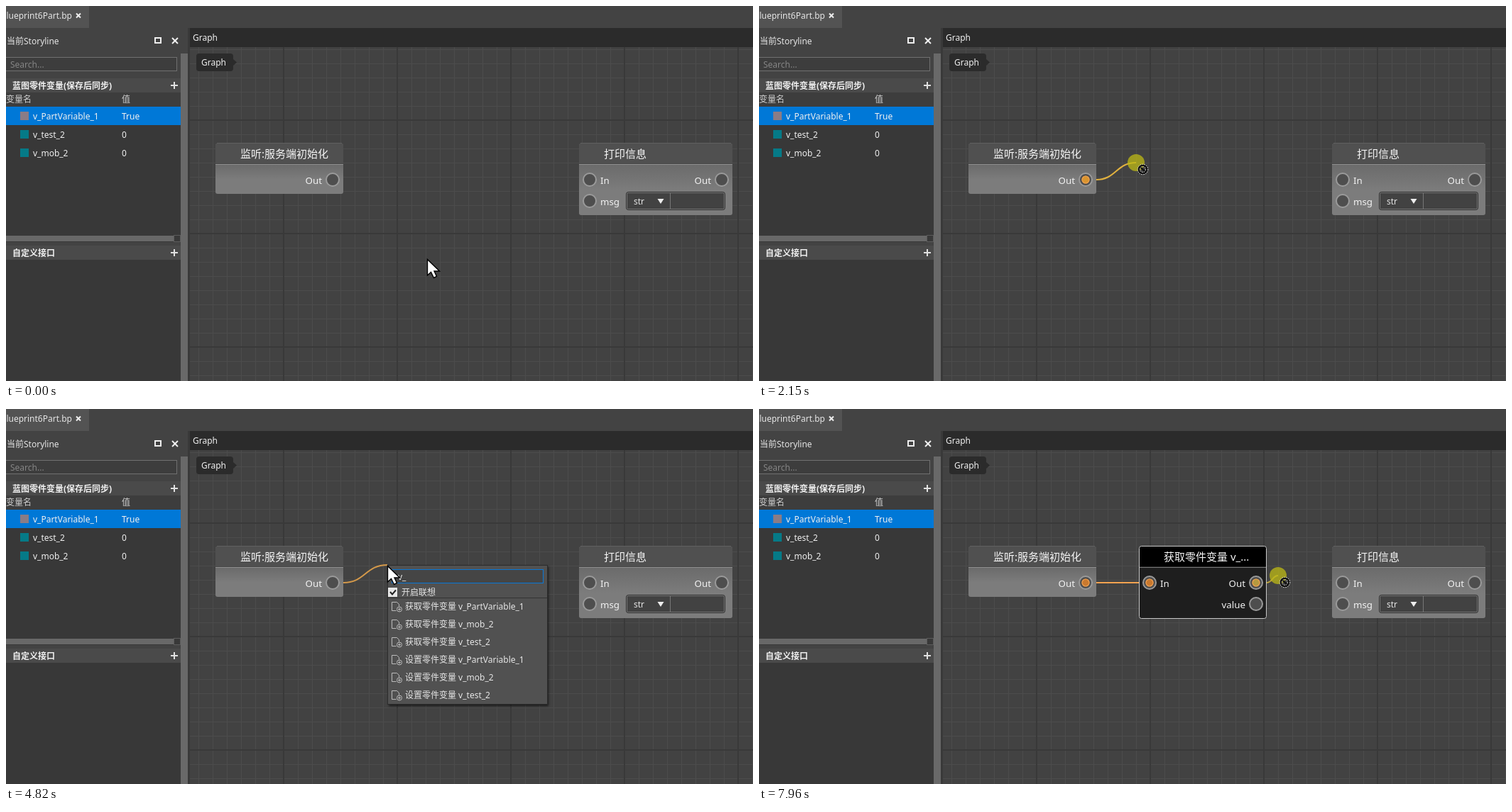
An HTML page with a canvas that plays this animation: 1052x529 px, repeating every 8000 ms.

```html
<!DOCTYPE html>
<html lang="zh">
<head>
<meta charset="utf-8">
<title>Node graph</title>
<style>
html, body { margin: 0; width: 100%; height: 100%; overflow: hidden; background: #424242; }
canvas { display: block; }
</style>
</head>
<body>
<canvas id="stage" width="1052" height="529"></canvas>
<script>
const ctx = document.getElementById('stage').getContext('2d');
const LOOP = 8000;
const FAMILY = '"Noto Sans", "Noto Sans CJK SC", "Noto Sans CJK", sans-serif';

// Pointer moves: first and last change, step count, start, control and end point.
const MOVES = [
  [70, 830, 11, [593, 357], [525, 300], [467, 248]],
  [900, 1660, 11, [467, 248], [482, 223], [516, 221]],
  [1730, 2360, 10, [516, 221], [528, 220], [537, 221]],
  [5610, 5880, 4, [537, 221], [552, 250], [575, 270]],
  [7020, 7160, 3, [575, 270], [664, 244], [688, 239]],
  [7420, 7490, 2, [688, 239], [691, 240], [693, 241]],
  [7820, 7960, 3, [693, 241], [712, 237], [731, 235]]
];
const CARETS = [[2430, 2900, 552], [3300, 3960, 558], [4160, 4820, 563], [5350, 5880, 563]];

const ALL_GROUPS = ['基础节点', '旧版节点', '零件节点', '零件界面节点', 'SdkNode', '拷贝模板',
  '零件变量', '创建分组', '内置游戏接口', '内置Python接口'];
const V_GROUPS = ['旧版节点', '零件节点', '零件界面节点', '零件变量', '内置游戏接口', '内置Python接口'];
const VARIABLES = ['v_PartVariable_1', 'v_mob_2', 'v_test_2'];
const MATCHES = ['获取', '设置'].flatMap(verb => VARIABLES.map(name => verb + '零件变量 ' + name));

function rect(x, y, w, h, color) {
  ctx.fillStyle = color;
  ctx.fillRect(x, y, w, h);
}

function frame(x, y, w, h, color) {
  ctx.strokeStyle = color;
  ctx.lineWidth = 1;
  ctx.strokeRect(x + .5, y + .5, w - 1, h - 1);
}

function roundBox(x, y, w, h, radius, fill, stroke) {
  ctx.beginPath();
  ctx.roundRect(x, y, w, h, radius);
  if (fill) { ctx.fillStyle = fill; ctx.fill(); }
  if (stroke) { ctx.strokeStyle = stroke; ctx.lineWidth = 1; ctx.stroke(); }
}

function text(str, x, y, color = '#e6e6e6', size = 12, weight = 400, align = 'left') {
  ctx.font = `${weight} ${size}px ${FAMILY}`;
  ctx.textAlign = align;
  ctx.fillStyle = color;
  ctx.fillText(str, x, y);
}

function line(points, color, width = 1) {
  ctx.beginPath();
  points.forEach(([x, y], i) => i ? ctx.lineTo(x, y) : ctx.moveTo(x, y));
  ctx.strokeStyle = color;
  ctx.lineWidth = width;
  ctx.stroke();
}

function polygon(points, fill) {
  ctx.beginPath();
  points.forEach(([x, y]) => ctx.lineTo(x, y));
  ctx.closePath();
  ctx.fillStyle = fill;
  ctx.fill();
}

function disc(x, y, r, fill) {
  ctx.beginPath();
  ctx.arc(x, y, r, 0, Math.PI * 2);
  ctx.fillStyle = fill;
  ctx.fill();
}

function ring(x, y, r, stroke, width) {
  ctx.beginPath();
  ctx.arc(x, y, r, 0, Math.PI * 2);
  ctx.strokeStyle = stroke;
  ctx.lineWidth = width;
  ctx.stroke();
}

function cross(x, y, r) {
  line([[x - r, y - r], [x + r, y + r]], '#f0f0f0', 2);
  line([[x - r, y + r], [x + r, y - r]], '#f0f0f0', 2);
}

function plus(x, y) {
  rect(x - 5, y - 1, 10, 2, '#e0e0e0');
  rect(x - 1, y - 5, 2, 10, '#e0e0e0');
}

function drawPanel() {
  rect(0, 0, 1052, 31, '#434343');
  rect(0, 0, 117, 31, '#535353');
  text('blueprint6Part.bp', -7, 18);
  cross(102, 13.5, 3);

  rect(0, 31, 259, 498, '#434343');
  text('当前Storyline', 1, 54);
  ctx.strokeStyle = '#f0f0f0';
  ctx.lineWidth = 2;
  ctx.strokeRect(210, 45, 8, 7);
  cross(238, 49, 4);
  rect(0, 72, 241, 20, '#3d3d3d');
  frame(-1, 72, 242, 20, '#707070');
  text('Search...', 6, 87, '#858585');

  rect(0, 102, 246, 20, '#4a4a4a');
  text('蓝图零件变量(保存后同步)', 9, 117, '#f0f0f0', 12, 700);
  plus(237, 112);
  rect(0, 122, 246, 20, '#3d3d3d');
  text('变量名', 0, 136, '#d0d0d0');
  text('值', 163, 136, '#d0d0d0');
  rect(0, 142, 246, 181, '#383838');
  rect(0, 142, 246, 26, '#0078d7');
  [['v_PartVariable_1', 'True', '#8a7c86'], ['v_test_2', '0', '#057a87'], ['v_mob_2', '0', '#057a87']]
    .forEach(([name, value, color], i) => {
      const y = 149 + i * 26;
      rect(20, y, 12, 12, color);
      text(name, 38, y + 11, '#f0f0f0');
      text(value, 163, y + 11, '#f0f0f0');
    });
  rect(0, 323, 246, 10, '#383838');
  rect(0, 324, 236, 8, '#686868');
  frame(236, 323, 10, 10, '#5c5c5c');
  rect(0, 338, 246, 20, '#4a4a4a');
  text('自定义接口', 9, 353, '#f0f0f0', 12, 700);
  plus(237, 348);
  rect(0, 358, 246, 171, '#383838');
  rect(246, 67, 10, 462, '#696969');
  rect(256, 31, 3, 498, '#393939');
}

function drawGrid() {
  rect(259, 58, 793, 471, '#424242');
  for (let x = 271; x < 1052; x += 20) rect(x, 58, 1, 471, '#4c4c4c');
  for (let y = 61; y < 529; y += 20) rect(259, y, 793, 1, '#4c4c4c');
  for (let x = 391; x < 1052; x += 160) rect(x - 1, 58, 2, 471, '#393939');
  for (let y = 161; y < 529; y += 160) rect(259, y - 1, 793, 2, '#393939');
  rect(259, 31, 793, 27, '#2b2b2b');
  text('Graph', 263, 49, '#f0f0f0');
  roundBox(268, 67, 52, 25, 4, '#2b2b2b');
  polygon([[320, 75], [325, 79.5], [320, 84]], '#2b2b2b');
  text('Graph', 275, 84, '#f0f0f0');
}

function port(x, y, core) {
  disc(x, y, 9, '#4e4e4e');
  ring(x, y, 9, '#9a9a9a', 2);
  if (!core) return;
  disc(x, y, 5.5, core);
  ring(x, y, 5, '#f0a050', 1.2);
}

function label(str, x, y, align) {
  text(str, x, y, '#f2f2f2', 13.33, 400, align);
}

function node(x, w, h, title, selected) {
  const body = ctx.createLinearGradient(0, 224, 0, 194 + h);
  body.addColorStop(0, '#6b6b6b');
  body.addColorStop(.5, '#7c7c7c');
  body.addColorStop(1, '#7c7c7c');
  roundBox(x, 194, w, h, 3, selected ? '#1e1e1e' : body);
  roundBox(x, 194, w, 29, [3, 3, 0, 0], selected ? '#000' : '#505050');
  rect(x, 222, w, 1, selected ? '#1e1e1e' : '#484848');
  rect(x, 223, w, 1, selected ? '#777' : '#909090');
  if (selected) roundBox(x + .5, 193.5, w - 1, h + 1, 3, null, '#c8c8c8');
  else rect(x + 2, 193, w - 4, 1, '#606060');
  text(title, x + 35, 214, '#f5f5f5', 15);
}

function drawNodes(linked, firstCore, secondCore) {
  node(295, 180, 71, '监听:服务端初始化');
  label('Out', 445, 251, 'right');
  port(460, 245, firstCore);

  node(807, 216, 101, '打印信息');
  port(822, 245);
  port(822, 275);
  port(1008, 245);
  label('In', 837, 251);
  label('msg', 837, 281);
  label('Out', 993, 251, 'right');
  roundBox(873.5, 262.5, 139, 25, 3, '#424242', '#2f2f2f');
  roundBox(874.5, 263.5, 137, 23, 2, null, '#777');
  rect(935, 264, 1, 22, '#777');
  text('str', 884, 280);
  polygon([[917.5, 272], [926.5, 272], [922, 279]], '#eee');

  if (!linked) return;
  line([[475, 245], [535, 245]], '#f7a350', 2);
  node(535, 180, 101, '获取零件变量 v_...', true);
  port(550, 245, '#c9792f');
  port(700, 245, secondCore);
  port(700, 275);
  label('In', 565, 251);
  label('Out', 685, 251, 'right');
  label('value', 685, 281, 'right');
}

function wire(x, [endX, endY], color) {
  const mid = (x + endX) / 2;
  ctx.beginPath();
  ctx.moveTo(x, 245);
  ctx.bezierCurveTo(mid, 245, mid, endY, endX, endY);
  ctx.strokeStyle = color;
  ctx.lineWidth = 2;
  ctx.stroke();
}

function docIcon(x, y) {
  line([[x + 6, y + 6], [x, y + 6], [x, y - 6], [x + 7, y - 6], [x + 10, y - 3], [x + 10, y]], '#bcbcbc');
  ring(x + 10.5, y + 4, 3.5, '#bcbcbc', 1);
  line([[x + 8.5, y + 4], [x + 12.5, y + 4]], '#bcbcbc');
  line([[x + 10.5, y + 2], [x + 10.5, y + 6]], '#bcbcbc');
}

function drawMenu(t, tip) {
  const wide = t >= 4230;
  const items = wide ? MATCHES : t >= 3370 ? V_GROUPS : ALL_GROUPS;
  const w = wide ? 225 : 126;
  const h = wide ? 197 : items === V_GROUPS ? 214 : 330;
  const query = t < 3300 ? '' : t < 4160 ? 'v' : 'v_';

  ctx.save();
  ctx.shadowColor = 'rgba(0,0,0,.6)';
  ctx.shadowBlur = 3;
  ctx.shadowOffsetX = ctx.shadowOffsetY = 2;
  rect(537, 220, w, h, '#515151');
  ctx.restore();
  frame(537, 220, w + 1, h, '#2c2c2c');

  const boxW = w - 11;
  rect(543, 226, boxW, 20, '#454545');
  frame(543, 226, boxW, 20, wide ? '#0878d8' : '#6a6a6a');
  rect(543, 226, boxW, 1, '#0878d8');
  text(query || '搜索...', 552, 241, query ? '#eee' : '#8c8c8c');
  const caret = CARETS.find(([from, to]) => t >= from && t < to);
  if (caret) rect(caret[2], 228, 1, 17, '#f0f0f0');

  rect(538, 252, 13, 13, '#e8e8e8');
  line([[541, 258], [544, 261.5], [549, 255.5]], '#222', 2);
  text('开启联想', 557, 263);
  rect(538, 266, w - 1, 1, '#333');

  items.forEach((item, i) => {
    const y = (wide ? 278.5 : 295.5) + i * 25;
    if (wide && !i && tip[1] >= 266) rect(538, 266, w - 1, 26, '#0072e8');
    text(item, 562, Math.floor(y) + 5);
    if (wide || item === '创建分组') docIcon(543.5, y);
    else polygon([[654, y - 3.5], [658, y], [654, y + 3.5]], '#c0c0c0');
  });
}

function arrow([x, y]) {
  ctx.beginPath();
  [[.5, .5], [.5, 23], [5.5, 18.5], [9.5, 26.5], [13.5, 24.5], [10, 17], [17.5, 17]]
    .forEach(([dx, dy]) => ctx.lineTo(x + dx, y + dy));
  ctx.closePath();
  ctx.fillStyle = '#fff';
  ctx.fill();
  ctx.strokeStyle = '#000';
  ctx.lineWidth = 1.4;
  ctx.stroke();
}

function forbidden([tipX, tipY]) {
  const x = tipX + 9.5, y = tipY + 9.5;
  ring(x, y, 5.7, '#111', 2.6);
  line([[x - 4, y - 4], [x + 4, y + 4]], '#111', 2.4);
  ctx.setLineDash([1.6, 1.4]);
  ring(x, y, 7.3, '#eee', 1);
  ring(x, y, 4, '#ddd', 1);
  ctx.setLineDash([]);
}

function pointerAt(t) {
  let tip = MOVES[0][3];
  for (const [start, end, count, a, control, b] of MOVES) {
    if (t < start) break;
    const step = Math.floor((t - start) * (count - 1) / (end - start) + 1e-6) + 1;
    const u = Math.min(step / count, 1), v = 1 - u;
    tip = a.map((p, i) => Math.round(v * v * p + 2 * u * v * control[i] + u * u * b[i]));
  }
  return tip;
}

function draw(t) {
  const tip = pointerAt(t);
  const firstDrag = t >= 900 && t < 2430;
  const secondDrag = t >= 7820;
  const menuOpen = t >= 2430 && t < 6350;
  const linked = t >= 6350;
  const dragging = firstDrag || secondDrag;

  drawPanel();
  drawGrid();
  drawNodes(linked, firstDrag ? '#d9952f' : linked ? '#c9792f' : null, secondDrag ? '#b59a40' : null);
  if (firstDrag && tip[0] > 477) wire(475, tip, '#e2b23f');
  if (secondDrag && tip[0] > 715) wire(715, tip, '#c2a83a');
  if (menuOpen) {
    wire(475, [537, 220], '#d4994a');
    drawMenu(t, tip);
  }
  if (dragging || (t >= 6280 && t < 6420)) disc(tip[0], tip[1], 12, 'rgba(190,186,22,.75)');
  if (dragging) forbidden(tip);
  else arrow(tip);
}

function tick() {
  draw(performance.now() % LOOP);
  requestAnimationFrame(tick);
}
tick();
</script>
</body>
</html>
```
